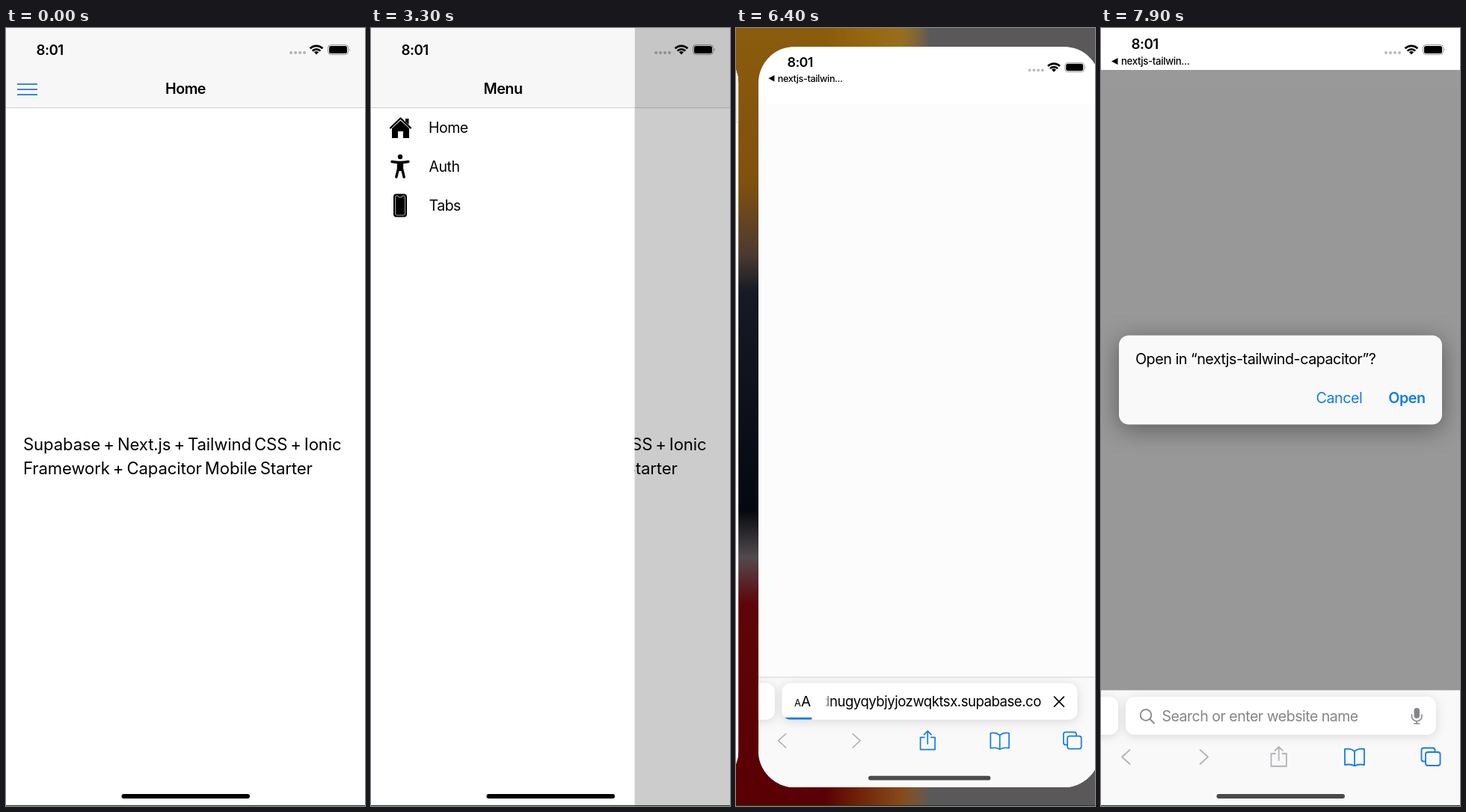
An HTML page for the animation above (8 s loop, 480 px wide and 1039 px high).

```html
<!DOCTYPE html>
<html lang="en">
<head>
<meta charset="utf-8">
<title>Mobile starter demo</title>
<style>
  html, body { margin: 0; width: 100%; height: 100%; overflow: hidden; background: #fff; }
  svg { display: block; }
  text { font: 18.5px Inter, "Noto Sans", sans-serif; letter-spacing: -.025em; }
  .mid { text-anchor: middle; }
  .end { text-anchor: end; }
  .title { font-size: 19.7px; font-weight: 600; }
  .row { font-size: 19.5px; }
  .hero { font-size: 22.15px; letter-spacing: -.0055em; word-spacing: -.093em; }
  .clock { font-size: 18.8px; font-weight: 600; letter-spacing: -.03em; }
  .crumb { font-size: 13.2px; font-weight: 500; }
  .field { font-size: 19.5px; }
  .ask { font-size: 19.75px; }
  .button { font-size: 19.2px; font-weight: 700; }
  .open { font-weight: 600; }
  .line { fill: none; stroke: currentColor; stroke-width: 1.8; stroke-linecap: round; stroke-linejoin: round; }
  .blue { color: #147ce5; }
  .gray { color: #b4b4b8; }
  .soft { filter: drop-shadow(0 2px 7px #0002); }
  #dialog rect { filter: drop-shadow(0 6px 16px #0006); }
</style>
</head>
<body>
<svg width="480" height="1039" viewBox="0 0 480 1039">
  <defs>
    <clipPath id="corners"><rect width="480" height="1039" rx="51"/></clipPath>
    <clipPath id="fieldClip"><rect x="33" y="893" width="415" height="51" rx="12"/></clipPath>
    <linearGradient id="sky" x2="0" y2="1">
      <stop offset="0" stop-color="#8a5c0c"/><stop offset=".2" stop-color="#80500f"/>
      <stop offset=".29" stop-color="#4c3a30"/><stop offset=".34" stop-color="#151a24"/>
      <stop offset=".62" stop-color="#06080f"/><stop offset=".68" stop-color="#514a4e"/>
      <stop offset=".74" stop-color="#5e0508"/><stop offset="1" stop-color="#5a0004"/>
    </linearGradient>
    <linearGradient id="haze">
      <stop offset=".25" stop-color="#b8860b" stop-opacity="0"/><stop offset=".46" stop-color="#a07a2a" stop-opacity=".6"/>
      <stop offset=".54" stop-color="#5a5859"/><stop offset="1" stop-color="#5a5859"/>
    </linearGradient>
    <linearGradient id="fade"><stop offset=".4" stop-color="#fff"/><stop offset="1" stop-color="#fff" stop-opacity="0"/></linearGradient>
    <g id="icons">
      <path d="M381 33h.1m5.9 0h.1m5.9 0h.1m5.9 0h.1" stroke="#000" stroke-opacity=".27" stroke-width="4" stroke-linecap="round"/>
      <g fill="none" stroke="#000" stroke-width="2.7">
        <path d="M406.6 27.3a12 12 0 0 1 16.8 0M409.7 30.6a7.6 7.6 0 0 1 10.6 0"/>
      </g>
      <path d="M415 35.5l-3.1-3.2a4.6 4.6 0 0 1 6.2 0z"/>
      <rect x="430.5" y="22.5" width="27" height="13" rx="4" fill="none" stroke="#000" stroke-opacity=".4"/>
      <rect x="432" y="24" width="24" height="10" rx="2.5"/>
      <path d="M459 27q2 2 0 4z" fill-opacity=".4"/>
    </g>
    <g id="header">
      <path d="M0 0h480v106H0z" fill="#f7f7f7"/>
      <path d="M0 106.5h480" stroke="#cfcfcf"/>
    </g>
    <path id="burger" d="M15 75h27M15 82h27M15 89h27" stroke="#4284dd" stroke-width="2.2"/>
    <rect id="grip" x="154.500" y="1023" width="171.500" height="6" rx="3"/>
  </defs>

  <path d="M0 0h480v1039H0z" fill="url(#sky)"/>
  <path d="M0 0h480v1039H0z" fill="url(#haze)"/>

  <g id="app">
    <path d="M0 0h480v1039H0z" fill="#fff"/>
    <use href="#header"/>
    <g id="home">
      <use href="#burger"/>
      <text class="title mid" x="240" y="88">Home</text>
      <text class="hero" x="23" y="563.5">Supabase + Next.js + Tailwind CSS + Ionic</text>
      <text class="hero" x="23" y="596">Framework + Capacitor Mobile Starter</text>
    </g>
    <g id="login">
      <path d="M65 0h415v106H65z" fill="#eee"/>
      <path d="M65 107h415v932H65z" fill="#fbfbfb"/>
      <use href="#burger"/>
      <text class="title mid" x="240" y="88">Login</text>
      <text x="57" y="174">Sign in via magic link with your email below:</text>
      <rect x="58" y="205" width="289" height="47" rx="5" fill="#fdfdfd" stroke="#dcdee2"/>
      <text x="67" y="235.5" fill="#a3a5aa">you@domain.test</text>
      <path d="M58 276h97.5v46H58z" fill="#60a5fa"/>
      <text class="button" x="76" y="306.5">Sign In</text>
      <text x="57" y="366.5">OR</text>
      <path d="M58 396.5h187.5v46H58z" fill="#34d399"/>
      <text x="75.5" y="427">Login with Qeblon</text>
    </g>
    <path id="shade" d="M0 0h480v1039H0z"/>
    <g id="menu">
      <path d="M0 0h352.5v1039H0z" fill="#fff"/>
      <path d="M0 0h352.5v106H0z" fill="#f7f7f7"/>
      <path d="M0 106.5h352.5" stroke="#cfcfcf"/>
      <text class="title mid" x="176.5" y="88">Menu</text>
      <path d="M26 133.5L39.5 120.5L53 133.5" class="line" style="stroke-width:2.4"/>
      <path d="M39.5 123.5L51 134v13h-8v-9h-7v9h-8v-13zM46 121h4.5v8L46 125z"/>
      <circle cx="39" cy="172" r="3.2"/>
      <path d="M28 178.5q11 2 22 0M36.5 180v8l-2.7 11M41.5 180v8l2.7 11" class="line" style="stroke-width:3.4"/>
      <path d="M35.5 178h7v13h-7z"/>
      <rect x="30" y="221.5" width="18" height="31" rx="4"/>
      <path d="M34.5 224h1.5q0 2 2 2h2q2 0 2-2h1.5q2 0 2 2v22q0 2-2 2h-9q-2 0-2-2v-22q0-2 2-2z" fill="none" stroke="#bbb" stroke-width=".9"/>
      <text class="row" x="77" y="139.5">Home</text>
      <text class="row" x="77.5" y="191.5">Auth</text>
      <text class="row" x="77.5" y="243.5">Tabs</text>
    </g>
    <text class="clock" x="40.5" y="36">8:01</text>
    <use href="#icons"/>
    <use href="#grip"/>
  </g>

  <g id="browser">
    <path d="M0 0h480v1039H0z" fill="#fff"/>
    <path d="M0 80h480v804H0z" fill="#fcfcfc"/>
    <text class="clock" x="40.5" y="28">8:01</text>
    <path d="M14 44.5l8.5-4.5v9z"/>
    <text class="crumb" x="27" y="49">nextjs-tailwin...</text>
    <use href="#icons"/>
    <path id="bars" d="M475 61v389M5.5 879h195" stroke="#7d7d7d" stroke-width="3.5" stroke-linecap="round"/>
    <path id="dim" d="M0 56h480v828H0z"/>
    <path d="M0 884h480v155H0z" fill="#f9f9fa"/>
    <path d="M0 884.5h480" stroke="#d2d2d4"/>
    <g class="soft" fill="#fff">
      <rect x="-60" y="893" width="83" height="51" rx="12"/>
      <rect x="33" y="893" width="415" height="51" rx="12"/>
    </g>
    <g id="address">
      <text class="field end" x="397" y="925.5">dnugyqybjyjozwqktsx.supabase.co</text>
      <path d="M86 900h17v36H86z" fill="url(#fade)"/>
      <text x="50.5" y="925.5" style="font-size:13.5px">A</text>
      <text x="60" y="925.5" style="font-size:20px">A</text>
      <path d="M415.5 912l13.5 13.5m0-13.5l-13.5 13.5" class="line"/>
      <path d="M33 941h42v3H33z" fill="#147ce5" clip-path="url(#fieldClip)"/>
    </g>
    <g id="search" color="#85858a">
      <circle cx="60" cy="917.5" r="7.3" class="line"/>
      <path d="M65.5 923l5.5 5.5" class="line"/>
      <text class="field" x="81.5" y="926" fill="#85858a">Search or enter website name</text>
      <rect x="418.5" y="908" width="7.5" height="14" rx="3.75" fill="#85858a"/>
      <path d="M415.5 917v2a6.7 6.7 0 0 0 13.5 0v-2M422.2 926v3m-3.5 0h7" class="line" style="stroke-width:1.5"/>
    </g>
    <path d="M38.5 964l-10.5 9.5 10.5 9.5M132.5 964l10.5 9.5-10.5 9.5" class="line gray"/>
    <path id="share" d="M233 969h-5.5v17h20.5v-17h-5.5M237.7 978v-18m-5 5l5-5 5 5"/>
    <g class="line blue">
      <path d="M339 966q-5-4.5-13-3v21q8-1.5 13 1.5q5-3 13-1.5v-21q-8-1.5-13 3zv19"/>
      <path d="M433.5 979.5h-2q-3 0-3-3v-12q0-3 3-3h12q3 0 3 3v2"/>
      <rect x="434" y="967" width="19.5" height="18" rx="3"/>
    </g>
    <use href="#grip" fill="#4a4a4a"/>
    <g id="dialog">
      <rect x="24" y="410.5" width="432" height="119" rx="13" fill="#f9f9fa"/>
      <text class="ask" x="46" y="448.5">Open in “nextjs-tailwind-capacitor”?</text>
      <text class="ask" x="287.5" y="501" fill="#147ce5">Cancel</text>
      <text class="ask end open" x="433.5" y="501" fill="#147ce5">Open</text>
    </g>
  </g>
  <path d="M0 1038.5h480" stroke="#123f0c"/>
</svg>
<script>
const el = id => document.getElementById(id);
const set = (id, attrs) => { for (const k in attrs) el(id).setAttribute(k, attrs[k]); };
const show = (id, on) => set(id, { display: on ? 'inline' : 'none' });
const clamp = x => Math.min(1, Math.max(0, x));
const ramp = (t, from, to) => clamp((t - from) / (to - from));

// cubic-bezier(.32, .72, 0, 1)
function ease(x) {
  let lo = 0, hi = 1, s = .5;
  for (let i = 0; i < 24; i++) {
    s = (lo + hi) / 2;
    if (.96 * s * (1 - s) ** 2 + s ** 3 < x) lo = s; else hi = s;
  }
  return 2.16 * s * (1 - s) ** 2 + 3 * s * s * (1 - s) + s ** 3;
}

function placeCard(id, center, scale, moving) {
  set(id, { transform: `translate(${center} 519.5) scale(${scale}) translate(-240 -519.5)` });
  if (moving) set(id, { 'clip-path': 'url(#corners)' });
  else el(id).removeAttribute('clip-path');
}

function drawMenu(t) {
  const x = clamp(t < 4000 ? (t - 2772) / 400 : (4230 - t) / 400);
  const open = x > 0 ? ease(x) : 0;
  set('menu', { transform: `translate(${(open - 1) * 352.5})` });
  set('shade', { opacity: open ** 3 * .2 });
  show('menu', open > 0);
  show('home', t < 4000);
  show('login', t >= 4000);
}

// The two app cards shrink, slide left on a damped spring and grow back.
function drawSwitch(t) {
  const moving = t >= 6000 && t < 6700;
  const w = Math.max(0, t - 6010) * .013;
  const scale = moving ? 1 - .198 * w ** 2.25 * Math.exp(-w) : 1;
  const left = moving ? (1 + w) * Math.exp(-w) : 0;
  const gap = 508 * scale;
  placeCard('app', 240 + (moving ? left - 1 : 0) * gap, scale, moving);
  placeCard('browser', 240 + left * gap, scale, moving);
  show('app', t < 6700);
  show('browser', t >= 6000);
}

function drawBrowser(t) {
  const loaded = t >= 7200;
  show('address', !loaded);
  show('search', loaded);
  set('share', { class: 'line ' + (loaded ? 'gray' : 'blue') });
  set('bars', { opacity: ramp(t, 6700, 7000) * (1 - ramp(t, 7100, 7500)) });
  const p = 1 - (1 - ramp(t, 7300, 7800)) ** 2;
  const scale = 1.15 - .15 * p;
  set('dim', { opacity: .4 * p });
  set('dialog', { opacity: p, transform: `translate(240 470) scale(${scale}) translate(-240 -470)` });
}

function frame() {
  const t = Math.floor(performance.now() % 8000 / 100) * 100;
  drawMenu(t);
  drawSwitch(t);
  drawBrowser(t);
  requestAnimationFrame(frame);
}
frame();
</script>
</body>
</html>
```
